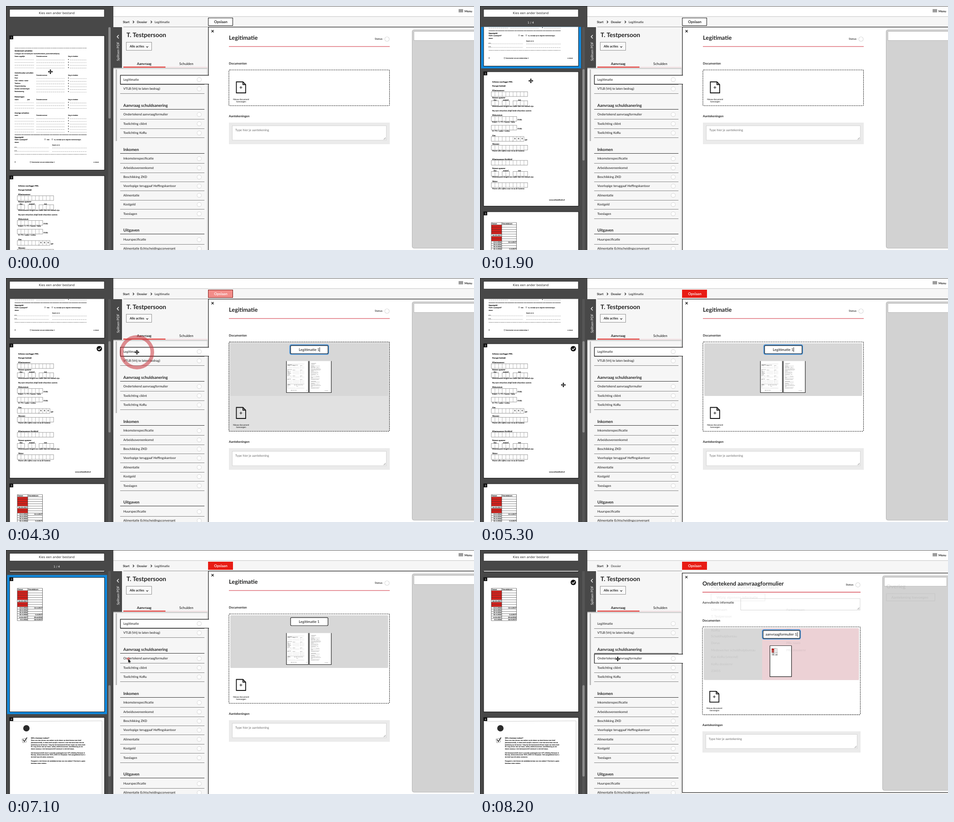
Write an HTML page that moves like this. It is 1033x542 px and loops after 8.3 s.

```html
<!DOCTYPE html>
<html lang="nl">
<head>
<meta charset="utf-8">
<title>Dossier</title>
<style>
html, body { margin: 0; height: 100%; overflow: hidden; background: #fff; }
svg { display: block; width: 100vw; height: 100vh; font-family: Lato, sans-serif; font-weight: 500; fill: #222; text-rendering: geometricPrecision; }
.ui { font-family: "DejaVu Sans", sans-serif; font-weight: 400; }
.scan { font-family: "Liberation Sans", Arial, sans-serif; }
.form { font-family: "Liberation Serif", "Times New Roman", serif; }
.scan text, .form text { stroke: #222; stroke-width: .18; }
.ghost { fill: #555; }
.light { fill: #fff; }
</style>
</head>
<body>
<svg id="stage" viewBox="0 0 1033 542" preserveAspectRatio="none"></svg>
<script>
const LOOP = 8300, STEP = 100, GAP = 311, TOP = 66;
const BOLD = 'font-weight="700"', SEMI = 'font-weight="600"', MID = 'text-anchor="middle"';

const text = (x, y, s, size = 7, attr = '') =>
  `<text x="${x}" y="${y + size * 0.34}" font-size="${size}" ${attr}>${s}</text>`;
const rect = (x, y, w, h, fill, attr = '') =>
  `<rect x="${x}" y="${y}" width="${w}" height="${h}" fill="${fill}" ${attr}/>`;
const path = (d, stroke = '#222', w = 1, attr = '') =>
  `<path d="${d}" fill="none" stroke="${stroke}" stroke-width="${w}" ${attr}/>`;
const hline = (x1, x2, y, stroke = '#858585', w = 1, attr = '') => path(`M${x1} ${y}H${x2}`, stroke, w, attr);
const dot = (x, y, r, fill, attr = '') => `<circle cx="${x}" cy="${y}" r="${r}" fill="${fill}" ${attr}/>`;
const group = (body, attr = '') => `<g ${attr}>${body}</g>`;
const at = (x, y, body) => group(body, `transform="translate(${x} ${y})"`);
const status = (x, y, r = 5) => dot(x, y, r, '#fff', 'stroke="#dcdcdc" stroke-width="1.2"');

// ---- scanned pages ----
function scanRows(y, n, cols, pitch = 6) {
  let out = '';
  for (let i = 0; i < n; i++) cols.forEach(([a, b], c) => {
    out += hline(a, b, y + i * pitch + (c ? 0.4 : 0), '#a5a5a5', 0.8, `stroke-dasharray="${1.6 + (i + c) % 3} .9"`);
  });
  return out;
}
const COLS = [[19, 62], [67, 130], [141, 178]];
const heads = (y, a) => text(19, y, a, 3.4) + text(67, y, 'Dossiernummer', 3.4) + text(137, y, 'Nog te betalen', 3.4);
const euros = (y, n) => Array.from({ length: n }, (_, i) => text(137, y + i * 6, '€', 3)).join('');
const block = (y, n) => scanRows(y, n, COLS) + euros(y - 1, n);
const tick = (x, y) => rect(x, y, 2.6, 2.6, '#fff', 'stroke="#444" stroke-width=".5"');

const page1 = group(
  hline(19, 178, 93.5, '#888', 1.1, 'stroke-dasharray="9 .6 4 .4"') +
  text(19, 100, 'Onderzoek schulden', 4, BOLD) +
  text(19, 105.5, 'Leningen van de bank (evt. huurachterstand, postorderbedrijven)', 3.2, BOLD) +
  heads(112, 'Naam opgelijst') + block(119.5, 4) +
  text(19, 148.5, 'Onderhoudse schulden', 4) + heads(154, 'soort') +
  ['Huur', 'Gas / elektra / water', 'Telefoon', 'Zorgverzekering', 'Andere verzekeringen', 'Bankrekening']
    .map((s, i) => text(19, 160 + i * 6, s, 3.4)).join('') +
  scanRows(161, 6, COLS.slice(1)) + euros(160, 6) +
  text(19, 202, 'Rekeningen', 3.8, BOLD) + heads(207.5, 'naam') + text(47, 207.5, 'jaar', 3.4) + block(215, 3) +
  text(19, 237.5, 'Overige schulden', 3.8, BOLD) + heads(243, 'soort') + block(250, 6) +
  hline(19, 178, 286, '#777', 1.3, 'stroke-dasharray="14 .6 6 .4"') +
  text(19, 291.5, 'Spaargeld', 4, BOLD) + text(19, 297, 'Heeft u spaargeld?', 3.4) +
  tick(85, 295) + text(90, 297, 'nee', 3.4) + tick(101, 295) +
  text(106, 297, 'Ja, namelijk op de volgende bankrekeningen', 3) + text(19, 303, 'datum', 3.4) +
  text(102, 308.5, 'Naam en nr.', 3.2) + text(19, 314, '€ 1.', 3.2) + text(19, 322, '€ 2.', 3.2) +
  scanRows(315, 2, [[24, 95], [102, 178]], 8) +
  hline(19, 178, 329.5, '#999', 1, 'stroke-dasharray="9 .5 3 .6"') +
  text(19, 347, '2', 4) + tick(53, 345.5) + text(57, 347, 'Documenten van een nalatenschap: 2', 3) +
  text(193, 347, 'nr. 000-00', 2.6), 'class="scan" transform="translate(-8 -66)"');

const cells = (x, y, n) => rect(x, y, n * 8, 10.5, '#fff', 'stroke="#777" stroke-width=".7"') +
  path(Array.from({ length: n - 1 }, (_, i) => `M${x + 8 * (i + 1)} ${y}v10.5`).join(''), '#888', 0.6);
const label = (y, s, b = BOLD) => text(27, y, s, 4.4, b);
const opname = y => label(y, 'Datum opname') + text(30, y + 5, 'dag', 4.4) + text(51, y + 5, 'maand', 4.4) +
  text(84, y + 5, 'jaar', 4.4) + cells(25, y + 6.5, 2) + cells(49, y + 6.5, 2) + cells(73, y + 6.5, 4) +
  label(y + 19, 'Meterstanden mogen niet ouder dan een maand zijn', '');
const komma = 'Noteer alle cijfers voor en na de komma';

const page2 = group(
  label(169, 'Schema voorlegger PRL') + label(178, 'Energie bedrijf:') +
  label(188, 'Klantnummer') + cells(25, 190.5, 10) + opname(204) +
  label(233, 'Bij twee telwerken altijd beide telwerken noteren', '') +
  label(243, 'Elektriciteit') + cells(25, 245.5, 7) + text(83, 252.5, 'KWh', 4.4) +
  label(258, 'Enkel / 1 / T1 / boven / links', '') + cells(25, 265, 7) + text(83, 272.5, 'KWh', 4.4) +
  label(278, 'II / T2 / onder / rechts', '') +
  label(287.5, 'Gas') + cells(25, 290, 9) + text(72, 298, ',', 5) +
  [77, 85, 93].map(x => text(x, 295, 'X', 4.4, MID)).join('') + text(99, 297.5, 'M³', 4.4) +
  label(307, 'Warmte') + cells(25, 309.5, 10) + label(322, komma, '') +
  label(341, 'Klantnummer Beekleid') + cells(25, 343, 10) + opname(361) +
  label(390, 'Water') + cells(25, 392.5, 10) + label(405.5, komma, '') +
  text(187, 431, 'www.stvhandboek.nl', 4.1, 'text-anchor="end"'),
  'class="form" transform="translate(-8 -146)"');

const ROW = 72 / 14;
const dates = ['24-10-2017', , , '13-1-2018', '22-2-2018', '31-3-2018', '31-1-2018', '4-12-2017', '8-1-2018'];
const moved = ['11-1-2017', '', '', '1-2-2017', '30-4-2018', '24-5-2017'];
const rowY = i => 162 + ROW * (i + 0.5);
const page3 = group(
  rect(25, 162 + ROW, 23, ROW * 4, '#d3211c') + rect(25, 162 + ROW * 6, 23, ROW * 2, '#d3211c') +
  path(Array.from({ length: 15 }, (_, i) => `M25 ${162 + i * ROW}H80.5`).join(''), '#333', 0.6) +
  path('M25 162v72M48 162v72M80.5 162v72', '#333', 0.7) +
  text(26, rowY(0), 'Datum:', 3.8) + text(49, rowY(0), 'Omzetdatum:', 3.8) +
  dates.map((s, i) => text(47.2, rowY(i + 5), s, 3.9, 'text-anchor="end"')).join('') +
  moved.map((s, i) => text(79.8, rowY(i + 8), s, 3.9, 'text-anchor="end"')).join(''),
  'class="scan" transform="translate(-8 -138)"');

const letter = [
  'Stuur ons dan binnen zes weken na de datum op deze factuur een brief',
  '(bezwaarschrift). In deze brief schrijft u waarom u het niet eens bent met de',
  'beslissing op de factuur. Voeg bij het bezwaarschrift een kopie van deze brief.',
  'En zorg ervoor dat uw naam, adres, telefoonnummer, handtekening en de',
  'datum waarop u het bezwaarschrift verstuurt in de brief staan.', '',
  'Het bezwaarschrift stuurt u (zonder postzegel) naar VZT, Afdeling Bezwaar &amp;',
  'Beroep, Antwoordnummer 0000, 0000 XX Dorpstad. Ook aangetekend kunt u',
  'de brief naar dit adres versturen.', '',
  'Reageert u niet binnen de wettelijke termijn van zes weken? Dan kunt u geen', 'bezwaar meer maken.'];
const page4 = group(
  path('M12 381L212 379.5V668', '#bbb', 0.7) + dot(45, 396, 7, '#2b2b2b') +
  rect(36, 419, 8.5, 8.5, '#fff', 'stroke="#777" stroke-width=".7" transform="rotate(-12 40 423)"') +
  path('M37.5 421l3 4.5l6-9', '#222', 1.5) + text(55, 418, 'Wilt u bezwaar maken?', 3.7, BOLD) +
  letter.map((s, i) => text(55, 423.3 + i * 4.55, s, 3.5)).join(''),
  'class="scan" transform="translate(-8 -372)"');

const pages = [page1, page2, page3, page4];
const sheet = (art, i) => at(8, TOP + GAP * i,
  rect(-5.5, -5.5, 220.5, 309, '#1089de', `id="sel${i}"`) +
  rect(0, 0, 209.5, 298.5, '#fff', 'stroke="#111" stroke-width="1"') + art +
  rect(0, 0, 8, 8, '#111') + text(4, 4, i + 1, 5, `${MID} class="ui light"`) +
  group(dot(198, 11, 6, '#111') + path('M195 11l2.3 2.5l4.2-4.8', '#fff', 1.5), `id="check${i}"`));

// ---- sidebar ----
const rows = [
  [163.5, 'Legitimatie'], [184, 'VTLB (Vrij te laten bedrag)'], [221, 'Aanvraag schuldsanering', 1],
  [241, 'Ondertekend aanvraagformulier'], [261.5, 'Toelichting cliënt'], [282, 'Toelichting KoRu'],
  [319, 'Inkomen', 1], [339, 'Inkomstenspecificatie'], [359.5, 'Arbeidsovereenkomst'], [380, 'Beschikking ZKD'],
  [400, 'Voorlopige teruggaaf Heffingskantoor'], [420.5, 'Alimentatie'], [441, 'Kostgeld'], [461.5, 'Toeslagen'],
  [498, 'Uitgaven', 1], [519, 'Huurspecificatie'], [539, 'Alimentatie Echtscheidingsconvenant']];
const snap = y => Math.round(y) + 0.5;
const row = ([y, s, head]) => head
  ? text(259, y, s, 8.9, BOLD) + hline(252, 438, snap(y + 8.2), '#333')
  : text(259, y, s) + status(426.5, y, 4.7) + hline(252, 438, snap(y + 10));
const active = (y, s, id) => group(
  rect(252, y - 10, 196, 20.5, '#fff') + path(`M448 ${y - 9.6}H252.5V${snap(y + 9.9)}H448`, '#111', 1.2) +
  text(259, y, s) + status(426.5, y, 4.7), `id="${id}"`);

// ---- document views ----
const area = (x, y, w, h) => rect(x, y, w, h, '#fff', 'stroke="#ccc" stroke-width=".8"') +
  path(`M${x + w - 6} ${y + h - 1.5}l4.5-4.5m-2 4.5l2-2`, '#555', 0.7);
const thumb = (x, y, art) => rect(x, y, 48.5, 70, '#fff') +
  group(art, `transform="translate(${x} ${y}) scale(.232)"`) +
  path(`M${x} ${y}v70h48.5v-70`, '#222', 1.2);
const field = (y, s, x, anchor, caret, id) => group(
  rect(626.8, y - 1.2, 85, 20.4, 'none', 'rx="3" stroke="#4a96dc" stroke-width="2.4"'), `id="${id}"`) +
  rect(628.2, y + 0.2, 82.5, 17.8, '#fff', 'rx="2" stroke="#222" stroke-width="1.2"') +
  text(x, y + 9, s, 8, `text-anchor="${anchor}"`) + path(`M${caret} ${y + 4}v10`, '#111', 0.9, `id="${id}Caret"`);

function view(id, title, dy, grow, card, extra = '') {
  const y = 142 + dy, end = y + 79.5 + grow, n = dy + grow;
  return group(
    rect(446.7, 46.8, 620, 496, '#fff', 'stroke="#111" stroke-width="1.2"') +
    path('M453.5 53.5l5 5m0-5l-5 5', '#111', 1.2) +
    text(492, 71, title, 12.8, BOLD) + text(814, 73, 'Status:', 6) + status(841, 73.5) +
    hline(492, 847, 90, '#cf2a38', 1.2) + extra + text(492, 128 + dy, 'Documenten', 6.9, BOLD) +
    rect(492, y, 354.5, end - y, '#fff', `id="${id}Box" rx="2" stroke="#111" stroke-width="1.1" stroke-dasharray="2.4 1.5"`) +
    card + at(518.5, end - 40.5,
      path('M-10 -12.5H4.5L10.5 -6.5V12H-10ZM4.5 -12.5V-6.5H10.5', '#111', 1.8) + path('M-3 0h6m-3-3v6', '#111', 1.1)) +
    text(519, end - 14.5, 'Nieuw document', 4.7, MID + ' ' + SEMI) + text(519, end - 9.3, 'toevoegen', 4.7, MID + ' ' + SEMI) +
    text(492, 245 + n, 'Aantekeningen', 6.8, BOLD) + rect(492, 259 + n, 355, 48, '#ebebeb') + area(499.5, 266 + n, 340, 32) +
    text(506, 276 + n, 'Type hier je aantekening', 7, 'fill="#777"') +
    rect(896.5, 53, 150, 485, '#d2d2d2', 'rx="4" stroke="#b5b5b5"') +
    rect(900.5, 56.5, 140, 20, '#fff', 'stroke="#bbb"'), `id="${id}"`);
}
const cardBox = y => rect(495, y, 348.5, 117, '#d7d7d7', 'rx="2"');
const EX = 26.4;
const views =
  view('empty', 'Legitimatie', 0, 0, '') +
  view('filled', 'Legitimatie', 0, 119, cardBox(145) + field(150, 'Legitimatie 1', 669, 'middle', 692.5, 'focus') +
    thumb(619, 184.5, page1) + thumb(669.5, 184.5, page2)) +
  view('signed', 'Ondertekend aanvraagformulier', EX, 119,
    cardBox(145 + EX) + rect(626, 145 + EX, 217, 117, '#ecd1d5') +
    field(150 + EX, 'aanvraagformulier 1', 704, 'end', 705, 'name') +
    thumb(643.5, 184.5 + EX, page3) + hline(643.5, 692, 184.5 + EX, '#333'),
    text(492, 113.5, 'Aanvullende informatie', 6.9) + area(578, 104.5, 268, 26));

const ghost = group(
  text(510, 82, 'Algemene dossierinformatie', 12, BOLD) + rect(510, 97, 119, 16, 'none', 'stroke="#777"') +
  text(522, 105, 'Wijzig algemene informatie', 7.6) +
  [[133, 'Cliëntnaam'], [148, 'T. Testpersoon'], [178, 'KoRu', 8.5], [192, 'Schuldhulpbureau'], [207, 'Dorus'],
    [223, 'Medewerker schuldhulpbureau'], [238, 'Kas KoRu (vreemd)'], [254, 'KoRu dossiernr'], [269, '23455']]
    .map(([y, s, z = 7.2]) => text(510, y, s, z)).join('') +
  [[133, 'Partnernaam'], [178, 'PRL'], [207, 'PRL naam'], [223, 'PRL dossiernr']]
    .map(([y, s]) => text(676, y, s, 7.2)).join('') +
  text(897, 81, 'Overleg', 12, BOLD) + rect(897, 97, 107, 16, 'none', 'stroke="#777"') +
  text(908, 105, 'Aantekening toevoegen', 7.8), 'id="ghost" class="ghost"');

// ---- pointers ----
const cross = 'M0-5.5l2.2 2.7H.8V-.8H2.8V-2.2L5.5 0L2.8 2.2V.8H.8V2.8H2.2L0 5.5L-2.2 2.8H-.8V.8H-2.8V2.2L-5.5 0L-2.8-2.2V-.8H-.8V-2.8H-2.2Z';
const pointers = dot(0, 0, 8, 'none', 'id="ring" stroke="#c8323a" stroke-width="8"') +
  group(`<path id="move" d="${cross}" fill="#111" stroke="#fff" stroke-width="1" paint-order="stroke"/>` +
    group(dot(0.5, 1, 3, '#e5484a', 'opacity=".75"') +
      '<path d="M0 0V10L2.3 8L3.8 11.3L5.5 10.5L4 7.4H7Z" fill="#111" stroke="#fff" stroke-width=".6"/>', 'id="arrow"'), 'id="pointer"');

const DARK = '#484848';
const stage = document.getElementById('stage');
stage.innerHTML =
  '<clipPath id="scrollport"><rect x="0" y="46.5" width="237" height="496"/></clipPath>' +
  rect(237, 0, 796, 23, '#fff') + rect(237, 23, 796, 24.5, '#f6f6f6') + rect(237, 47, 210, 495, '#f6f6f6') +
  hline(237, 1033, 23.5, '#c4c4c4') + hline(237, 1033, 0.5, '#555') +
  path('M999 8h10M999 10.5h10M999 13h10', '#111', 1.1) + text(1012, 11.5, 'Menu', 6.6, BOLD) +
  text(258, 36, 'Start', 6.8, BOLD) + text(289, 36, 'Dossier', 6.7, 'id="crumb2"') +
  path('M280 33l2.5 2.5l-2.5 2.5', '#111', 1.1) +
  group(path('M319.5 33l2.5 2.5l-2.5 2.5', '#111', 1.1) + text(328, 36, 'Legitimatie', 6.8), 'id="crumb3"') +
  hline(259, 446, 46.5, '#999') +
  text(266, 64, 'T. Testpersoon', 13.6, BOLD) + rect(265.5, 80.5, 56, 18, '#f9f9f9', 'stroke="#888" stroke-width=".9"') +
  text(273, 90, 'Alle acties', 7, BOLD) + path('M309.5 89.5l2.2 2.4l2.2-2.4', '#111', 1.1) +
  text(305, 128, 'Aanvraag', 7.7, BOLD + ' ' + MID) + text(398, 128, 'Schulden', 7.7, MID) +
  hline(352, 445, 136, '#f0c9d0') + hline(259, 352, 135.8, '#e0231f', 2) +
  rect(237, 137.5, 208, 2.5, '#cfcfcf') + rect(242, 141, 3, 159, '#bdbdbd') + rect(443.5, 140, 1.2, 402, '#d5d5d5') +
  rows.map(row).join('') + views + ghost +
  active(163.5, 'Legitimatie', 'row1') + active(241, 'Ondertekend aanvraagformulier', 'row2') +
  rect(446.5, 26.5, 54, 17, '#fff', 'stroke="#111"') +
  rect(446, 26, 55, 18, '#e81c14', 'id="saveRed"') + text(474, 35, 'Opslaan', 8.2, `${MID} ${SEMI} id="save"`) +
  rect(0, 0, 237, 542, DARK) + rect(237, 47, 19, 90.5, DARK) + path('M.5 0V542M0 .5H237', '#2b2b2b') +
  path('M248.8 64.5l-3.5 3.7l3.5 3.7', '#fff', 1.4) +
  '<text transform="translate(249.5 122) rotate(-90)" font-size="7.5" fill="#eee">Splitsen PDF</text>' +
  rect(8, 7.5, 209, 16.8, '#fff', 'stroke="#222" stroke-width=".8"') +
  text(112, 16, 'Kies een ander bestand', 6.67, MID + ' class="ui"') +
  text(112, 37, '', 6.2, `${MID} class="ui light" id="count"`) +
  rect(225.5, 47, 6, 495, '#555') + rect(226, 47, 5, 203, '#8b8b8b', 'id="bar" rx="2.5"') +
  group(group(pages.map(sheet).join(''), 'id="pages"'), 'clip-path="url(#scrollport)"') + pointers;

// ---- motion ----
const $ = id => document.getElementById(id);
const set = (id, name, v) => $(id).setAttribute(name, v);
const show = (id, on) => { $(id).style.visibility = on ? 'visible' : 'hidden'; };
const track = (...keys) => t => {
  const i = keys.findIndex(k => k[0] > t);
  if (i < 0) return keys[keys.length - 1][1];
  if (!i) return keys[0][1];
  const [t0, a] = keys[i - 1], [t1, b] = keys[i];
  return a + (b - a) * (t - t0) / (t1 - t0);
};
const between = (t, a, b) => t >= a && t < b;

const scroll = track([700, 0], [1000, 64], [1200, 117], [1500, 198], [1800, 231],
  [5600, 231], [5900, 440], [6100, 550], [6300, 604], [6600, 627]);
const px = track([0, 98], [100, 110], [1800, 110], [2200, 119], [2700, 119], [2900, 129.5], [3100, 129.5],
  [3800, 289], [4900, 289], [5300, 184], [6900, 184], [7100, 269.5], [7300, 304]);
const py = track([0, 146], [100, 154], [1800, 154], [2200, 203], [2700, 203], [2900, 225], [3100, 225],
  [3800, 165], [4900, 165], [5300, 237.5], [6900, 237.5], [7100, 241], [7300, 242]);
const saved = track([4000, 0], [4600, 1]);
const tint = track([4000, 209], [4300, 225], [4600, 255]);
const fade = track([7700, 0], [7900, 0.9], [8000, 0.7], [8100, 0.4], [8200, 0.13]);
const enter = track([7900, 0], [8000, 0.35], [8200, 1]);
const zoom = track([8000, 0.95], [8200, 0.983]);
const clicks = [500, 2200, 4000, 7700];

function draw(t) {
  const s = scroll(t), x = px(t), y = py(t), drop1 = t >= 4000, drop2 = t >= 7800;
  set('pages', 'transform', `translate(0 ${-s})`);
  set('bar', 'y', 47 + s * 0.404);

  show('sel0', between(t, 500, 4000));
  show('sel1', between(t, 2200, 4000));
  show('sel2', between(t, 7000, 7800));
  show('sel3', false);
  show('check0', drop1); show('check1', drop1); show('check2', drop2); show('check3', false);
  $('count').textContent = between(t, 500, 2200) || between(t, 7000, 7800) ? '1 / 4' : between(t, 2200, 4000) ? '2 / 4' : '';

  show('empty', !drop1);
  show('filled', drop1 && t < 8100);
  const typing = between(t, 4000, 6800);
  show('focus', typing); show('focusCaret', typing);
  const g = Math.round(tint(t));
  set('filledBox', 'fill', `rgb(${g},${g},${g})`);
  set('saveRed', 'opacity', saved(t));
  set('save', 'fill', saved(t) > 0.3 ? '#fff' : '#111');

  set('signed', 'opacity', enter(t));
  set('signed', 'transform', `translate(433 306) scale(${zoom(t)}) translate(-433 -306)`);
  set('ghost', 'opacity', fade(t));
  show('row1', !drop2); show('row2', drop2); show('crumb3', !drop2);
  set('crumb2', 'font-weight', drop2 ? 400 : 700);

  const dragging = between(t, 2900, 3900) || between(t, 7000, 7600);
  set('pointer', 'transform', `translate(${x} ${y})`);
  show('move', !dragging); show('arrow', dragging);
  const start = clicks.find(c => between(t, c, c + 500));
  show('ring', start !== undefined);
  if (start !== undefined) {
    const k = (t - start) / STEP;
    set('ring', 'transform', `translate(${x} ${y})`);
    set('ring', 'r', 4 + k * 10);
    set('ring', 'opacity', 0.75 - k * 0.07);
  }
}

const begin = performance.now();
function play() {
  const t = (performance.now() - begin) % LOOP;
  draw(Math.floor(t / STEP) * STEP);
  requestAnimationFrame(play);
}
play();
</script>
</body>
</html>
```
